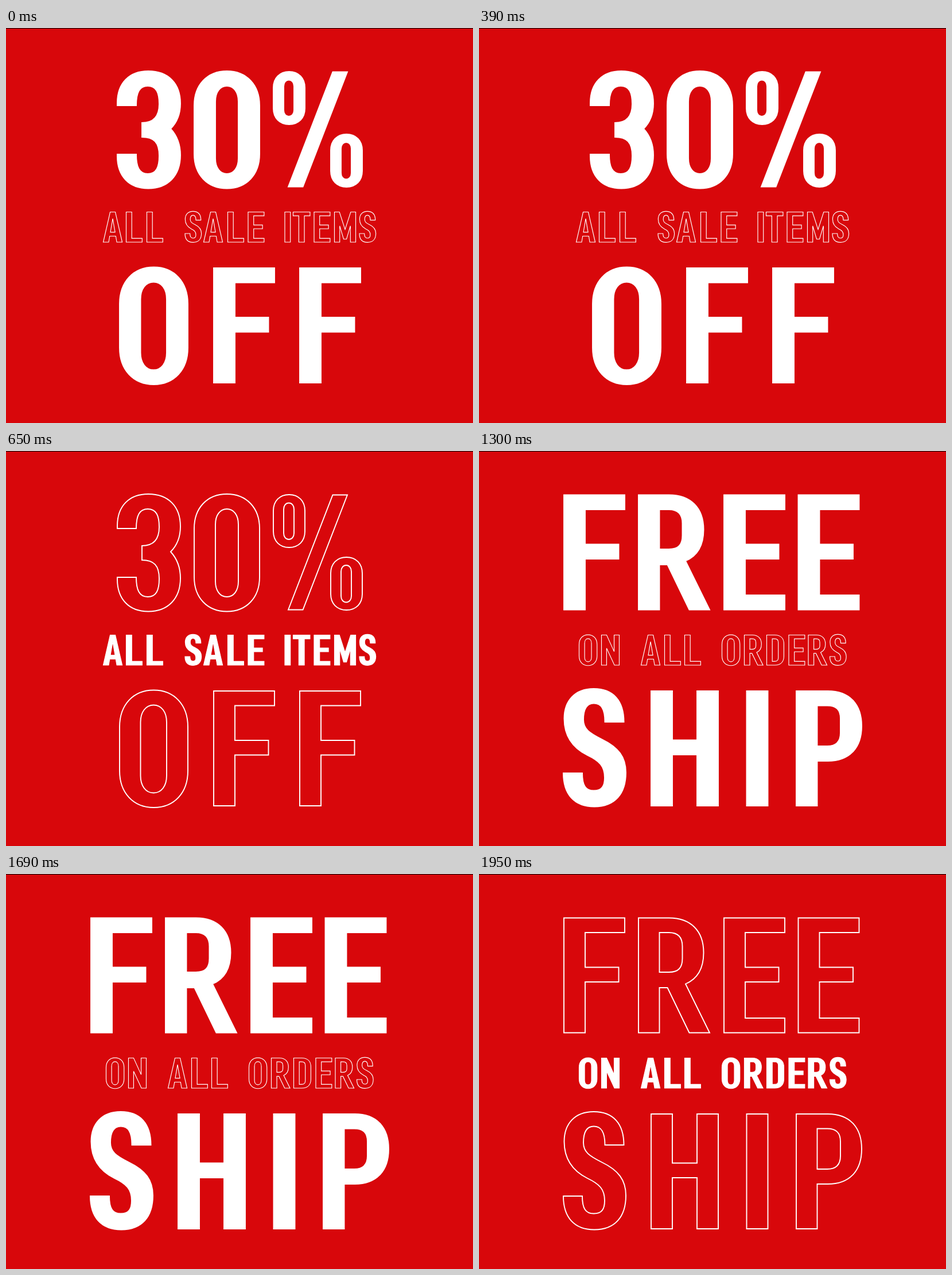
These frames come from a looping animation (814x688 px, 2550 ms). An HTML page:

```html
<!DOCTYPE html>
<html lang="en">
<head>
<meta charset="utf-8">
<title>30% off all sale items</title>
<style>
  html, body { margin: 0; width: 100%; height: 100%; overflow: hidden; background: #d8070b; }
  svg { display: block; width: 814px; height: 688px; }
  path { fill: #fff; fill-rule: evenodd; stroke: #fff; vector-effect: non-scaling-stroke; }
  .big path { stroke-width: 1.9; }
  .small path { stroke-width: 1.15; }
</style>
</head>
<body>
<svg id="stage" viewBox="0 0 814 688" role="img" aria-label="30% off all sale items. Free ship on all orders.">
  <rect width="814" height="688" fill="#d8070b"/>
  <rect width="814" height="1" fill="#000"/>
</svg>
<script>
// Closed round shape with straight sides and caps of height r.
function oval(x0, y0, x1, y1, r) {
  const cx = (x0 + x1) / 2, k = 0.6, dx = (x1 - x0) / 2 * k, dy = r * (1 - k);
  return `M${x0} ${y0 + r}C${x0} ${y0 + dy} ${cx - dx} ${y0} ${cx} ${y0}` +
    `C${cx + dx} ${y0} ${x1} ${y0 + dy} ${x1} ${y0 + r}V${y1 - r}` +
    `C${x1} ${y1 - dy} ${cx + dx} ${y1} ${cx} ${y1}` +
    `C${cx - dx} ${y1} ${x0} ${y1 - dy} ${x0} ${y1 - r}Z`;
}

// Glyph outlines: cap line at 0, baseline at 200.
const glyphs = {
  A: 'M0 200L46 0H80L126 200H90L83 160H43L36 200ZM63 44L78.5 134H47.5Z',
  D: 'M0 0H53C92 0 114 22 114 60V140C114 178 92 200 53 200H0Z' +
     'M37 25.5V174.5H53C70 174.5 77 166 77 150V50C77 33 70 25.5 53 25.5Z',
  E: 'M0 0H106V25.5H37V86H95.5V111.5H37V174.5H106V200H0Z',
  F: 'M0 0H106V25.5H37V86H95.5V111.5H37V200H0Z',
  H: 'M0 0H37V85.5H80V0H117V200H80V111H37V200H0Z',
  I: 'M0 0H37V200H0Z',
  L: 'M0 0H37V174.5H106V200H0Z',
  M: 'M0 200V0H33L70.5 116L108 0H141V200H106V92L80 180H61L35 92V200Z',
  N: 'M0 200V0H34L84 110V0H118V200H86L34 88V200Z',
  O: oval(0, -1.5, 119, 203, 64) + oval(36.5, 24.5, 82, 177.5, 30),
  P: 'M0 0H55C92 0 114 22 114 61C114 100 92 122 55 122H36.5V200H0Z' +
     'M36.5 25.5V96H54C70 96 77 87 77 73V48C77 33 70 25.5 54 25.5Z',
  R: 'M0 0H53C91 0 113.5 22.5 113.5 60.5C113.5 89.5 102 106.5 82 115L124 200H88.5L50.5 121.5H36.5V200H0Z' +
     'M36.5 25.5V94.5H53C70 94.5 76.5 86.5 76.5 70.5V49.5C76.5 33.5 69 25.5 53 25.5Z',
  S: 'M72.5 54H105.5C105.5 17 87 -4 53 -4C20 -4 1.5 17 1.5 48C1.5 77 14 98 42 112' +
     'C63 122 72 131 72 151C72 166 67 173.5 53 173.5C39 173.5 33 165 33 143H0' +
     'C0 180 19 201.5 54 201.5C90 201.5 109 179 109 142C109 115 96 98 67 84' +
     'C45 73 35 66 35 50C35 32 41 21.5 53 21.5C66 21.5 72.5 31 72.5 54Z',
  T: 'M0 0H112V25.5H74.5V200H37.5V25.5H0Z',
  3: 'M0 58.5V54C0 19 21 -1.5 54 -1.5C89 -1.5 110 20 110 55C110 74 103 89 93 99' +
     'C104 111 110 126 110 145C110 181 88 203 54 203C20 203 0 181 0 147V143.5H33' +
     'C33 165 38 177.5 53 177.5C68 177.5 73 166 73 146C73 123 64 113.5 43 113.5V88.5' +
     'C63 88.5 73 77 73 56C73 36 68 24.5 53 24.5C39 24.5 33 35 33 58.5Z',
  0: oval(0, -1.5, 114, 203, 60) + oval(37, 24.5, 77, 177.5, 27),
  '%': oval(0, -0.5, 55, 91.5, 28) + oval(18, 14, 36, 77.5, 11) +
     'M26 200L103.5 0H129L51.5 200Z' +
     oval(100, 108.5, 155, 200.5, 28) + oval(118, 122.5, 136, 187, 11)
};

const rows = { top: 76.5, mid: 320.5, low: 418 };
const scenes = [
  {
    top: ['30%', [194, 328, 466]],
    mid: ['ALLSALEITEMS', [169.5, 209.5, 245.5, 312, 344.5, 386.5, 422, 486, 500.5, 537, 572.5, 616]],
    low: ['OFF', [198, 362, 512]]
  },
  {
    top: ['FREE', [148, 278, 427, 556.5]],
    mid: ['ONALLORDERS', [174.5, 213.5, 282.5, 323.5, 358.5, 423.5, 462.5, 501.5, 540, 574, 611.5]],
    low: ['SHIP', [147, 300, 466.5, 553]]
  }
];

// Start of each step in ms; values switch hard at these times.
const loop = 2550, starts = [0, 650, 1300, 1950];
function step(el, prop, values) {
  const frames = starts.map((t, i) => ({ offset: t / loop, [prop]: values[i], easing: 'step-end' }));
  frames.push({ offset: 1, [prop]: values[0] });
  el.animate(frames, { duration: loop, iterations: Infinity });
}

function add(parent, tag, attrs) {
  const el = document.createElementNS('http://www.w3.org/2000/svg', tag);
  for (const name in attrs) el.setAttribute(name, attrs[name]);
  return parent.appendChild(el);
}

const stage = document.getElementById('stage');
scenes.forEach((scene, n) => {
  const group = add(stage, 'g', {});
  step(group, 'opacity', n ? [0, 0, 1, 1] : [1, 1, 0, 0]);
  for (const row in rows) {
    const small = row === 'mid', scale = small ? 0.2625 : 1;
    const [text, xs] = scene[row];
    const line = add(group, 'g', { class: small ? 'small' : 'big' });
    [...text].forEach((ch, i) => add(line, 'path', {
      d: glyphs[ch],
      transform: `translate(${xs[i]} ${rows[row]}) scale(${scale})`
    }));
    step(line, 'fillOpacity', small ? [0, 1, 0, 1] : [1, 0, 1, 0]);
  }
});
</script>
</body>
</html>
```
